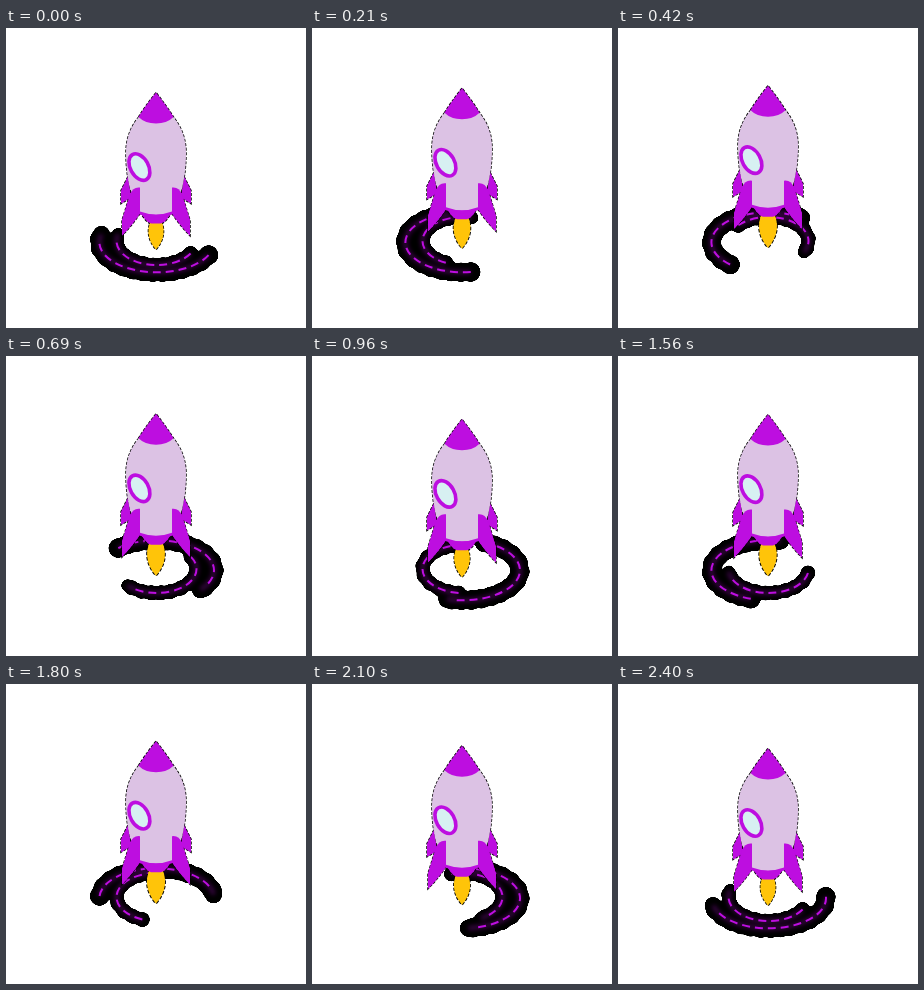
An HTML page that plays this animation: 300x300 px, repeating every 2.43 s.

```html
<!DOCTYPE html>
<html lang="en">
<head>
<meta charset="utf-8">
<title>Rocket</title>
<style>
html, body { margin: 0; width: 100%; height: 100%; overflow: hidden; background: #fff; }
svg { display: block; width: 100vw; height: 100vh; }
</style>
</head>
<body>
<svg viewBox="0 0 300 300">
  <defs>
    <filter id="merge" filterUnits="userSpaceOnUse" x="0" y="0" width="300" height="300">
      <feGaussianBlur stdDeviation="1.8"/>
      <feComponentTransfer><feFuncA type="linear" slope="12" intercept="-5"/></feComponentTransfer>
    </filter>
    <filter id="soften" filterUnits="userSpaceOnUse" x="0" y="0" width="300" height="300">
      <feGaussianBlur stdDeviation="2.2"/>
    </filter>
  </defs>
  <g fill="none">
    <g id="smoke" stroke="#000" stroke-linecap="round" filter="url(#merge)"></g>
    <g id="glow" stroke="#bd0ee0" opacity=".25" filter="url(#soften)"></g>
    <g id="sparks" stroke="#bd0ee0"></g>
  </g>
  <g id="rocket" fill="#bd0ee0">
    <use href="#hull" stroke="#000" stroke-width="1.5" stroke-dasharray="3 1.5"/>
    <g id="hull">
      <path id="flame" fill="#ffc409" d="M145 193C141 201 141 212 150 222C159 212 159 201 155 193Z"/>
      <path d="M134 184Q140 195 145 196H155Q160 195 166 184Z"/>
      <g id="fins">
        <path d="M122 149L115 163V176L125 170Z"/>
        <path id="frontFin" d="M134 160Q127 159 124 167L116 193V208Q125 199 134 186Z"/>
      </g>
      <use href="#fins" transform="matrix(-1 0 0 1 300 0)"/>
      <path fill="#dcc2e4" d="M133 89C124 100 120 112 120 125C120 141 122 152 124 161L134 185Q150 190 166 185L176 161C178 152 180 141 180 125C180 112 176 100 167 89Z"/>
      <path d="M150 65Q139 79 132.5 89.5Q139 96 150 96Q161 96 167.5 89.5Q161 79 150 65Z"/>
    </g>
    <path d="M134 184Q150 190 166 184V187Q150 193 134 187Z"/>
    <use href="#frontFin"/>
    <use href="#frontFin" transform="matrix(-1 0 0 1 300 0)"/>
    <ellipse cx="133.4" cy="139.5" rx="9" ry="14.3" transform="rotate(-29 133.4 139.5)" fill="#d7f0f2" stroke="#bd0ee0" stroke-width="3.6"/>
  </g>
</svg>
<script>
const LOOP = 2430, STEP = 30, BOB = 1250;
const $ = id => document.getElementById(id);

// Each trail is a dashed piece of an ellipse, positioned by its dash offset.
function makeTrail({ cx, cy, rx, ry, length, span, width, start, period }) {
  const pieces = [];
  const stroke = (layer, weight, on, off) => {
    const ellipse = document.createElementNS("http://www.w3.org/2000/svg", "ellipse");
    const count = Math.max(1, Math.floor((span + off) / (on + off)));
    const dashes = Array(count).fill([on, off]).flat();
    dashes[dashes.length - 1] = length - count * on - (count - 1) * off;
    const attributes = {
      cx, cy, rx, ry, pathLength: length,
      "stroke-width": weight, "stroke-dasharray": dashes.join(" ")
    };
    for (const name in attributes) ellipse.setAttribute(name, attributes[name]);
    $(layer).append(ellipse);
    pieces.push(ellipse);
  };
  stroke("smoke", width, span, 0);
  stroke("smoke", width + 2.5, 0.01, 10);
  stroke("glow", 5, span, 0);
  stroke("sparks", 2, 8, 5);
  return time => {
    const offset = -length * ((start + time / period) % 1);
    for (const piece of pieces) piece.setAttribute("stroke-dashoffset", offset);
  };
}

const trails = [
  makeTrail({ cx: 150.7, cy: 214.3, rx: 57.3, ry: 30, length: 282, span: 135, width: 17, start: .051, period: 1235 }),
  makeTrail({ cx: 150.5, cy: 213, rx: 40, ry: 24, length: 204, span: 95, width: 12.5, start: .07, period: 800 })
];

const bezier = (a, b, u) => 3 * a * u * (1 - u) ** 2 + 3 * b * u * u * (1 - u) + u ** 3;

function ease(x) {
  let low = 0, high = 1;
  for (let i = 0; i < 20; i++) {
    const mid = (low + high) / 2;
    if (bezier(.25, .25, mid) < x) low = mid; else high = mid;
  }
  return bezier(.1, 1, low);
}

function draw() {
  const time = Math.floor(performance.now() % LOOP / STEP) * STEP;
  const half = time % BOB / BOB * 2;
  const lift = half < 1 ? ease(half) : 1 - ease(half - 1);
  $("rocket").setAttribute("transform", `translate(0 ${-.4 - 7.5 * lift})`);
  $("flame").setAttribute("transform", `translate(150 195) scale(${1 + .2 * lift}) translate(-150 -195)`);
  trails.forEach(move => move(time));
  requestAnimationFrame(draw);
}
draw();
</script>
</body>
</html>
```
